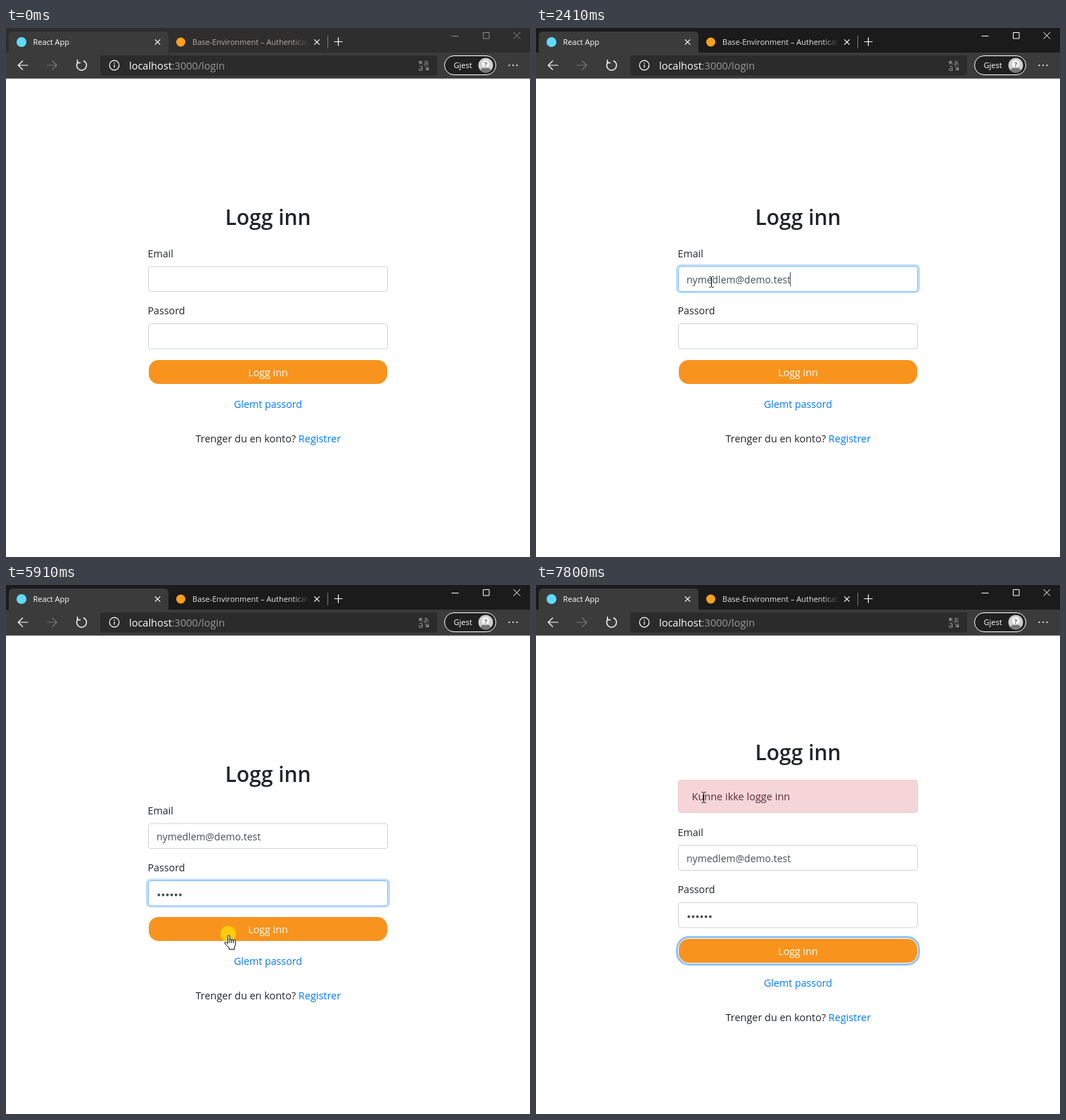
Recreate the animation shown at these times as an HTML page. Size 745 by 752 pixels, loop 8000 ms.

```html
<!DOCTYPE html>
<html lang="no">
<head>
<meta charset="utf-8">
<title>Logg inn</title>
<style>
  html, body { margin: 0; width: 100%; height: 100%; overflow: hidden; background: #fff; }
  svg { display: block; }
  text { font: 14.25px "Open Sans", "Noto Sans", sans-serif; fill: #212529; }
  .mid { text-anchor: middle; }
  .small { font-size: 11px; fill: #fff; }
  .url { font-size: 14.5px; fill: #fff; }
  .link { fill: #007bff; }
  .value { fill: #495057; }
  .line { fill: none; stroke: #fff; stroke-width: 1.2; }
  .ring { fill: none; stroke: #007bff; stroke-width: 3; stroke-opacity: .25; }
  .box { fill: #fff; stroke: #ced4da; }
  .caret { stroke: #495057; }
</style>
</head>
<body>
<svg width="745" height="752" viewBox="0 0 745 752">
  <defs>
    <linearGradient id="fade" gradientUnits="userSpaceOnUse" x1="408" x2="430" y1="0" y2="0">
      <stop stop-color="currentColor"/>
      <stop offset="1" stop-color="currentColor" stop-opacity="0"/>
    </linearGradient>
    <path id="cross" d="M-3.7-3.7l7.4 7.4m0-7.4l-7.4 7.4"/>
  </defs>

  <!-- browser frame -->
  <rect id="titlebar" width="745" height="36"/>
  <path fill="#3b3b3b" d="M0 35h4V11q0-6 6-6h215q6 0 6 6v24h514v37H0z"/>
  <path stroke="#555" d="M0 71.500h745"/>
  <circle cx="22" cy="20" r="7" fill="#61dafb"/>
  <text class="small" x="38.500" y="24">React App</text>
  <use href="#cross" class="line" x="215.500" y="20"/>
  <circle cx="248.500" cy="20" r="6.500" fill="#f9a11b"/>
  <text class="small" x="265" y="24" style="fill:url(#fade)">Base-Environment – Authentication</text>
  <use href="#cross" class="line" x="442" y="20"/>
  <path class="line" style="stroke:#777;stroke-width:1" d="M457.500 11v18"/>
  <path class="line" d="M466.500 19.500h12m-6-6v12"/>
  <path id="controls" class="line" style="stroke-width:1" d="M633.500 11.500h10M678.500 6.500h8.500v8.500h-8.500zM721.500 6l9.500 9.500m0-9.500l-9.500 9.500"/>
  <path class="line" d="M31.500 53h-14m6.500-6.500L17.300 53l6.700 6.500"/>
  <path class="line" style="stroke:#777" d="M58 53h14m-6.500-6.500L72.200 53l-6.700 6.500"/>
  <path class="line" style="stroke-width:1.400" d="M102.500 48.200a7 7 0 1 0 7.500-1.700M101.500 45v4.500h4.500"/>
  <rect x="134" y="39" width="479" height="28.500" rx="3" fill="#2b2b2b"/>
  <circle class="line" cx="154" cy="53" r="6.800"/>
  <path class="line" d="M154 52v4.500m0-7.500v1.500"/>
  <text class="url" x="175" y="58.500">localhost<tspan fill="#9a9a9a">:3000/login</tspan></text>
  <g fill="#9a9a9a">
    <text x="586.500" y="60.500" style="font-size:12px;fill:inherit">a</text>
    <text x="593.500" y="53" style="font:8px 'Noto Sans CJK JP','Noto Sans CJK',sans-serif;fill:inherit">あ</text>
    <path class="line" style="stroke:#9a9a9a" d="M592 47.500h-4v4m0-4l4 4M596.500 55.500l4 4m0-4v4h-4"/>
  </g>
  <rect x="623.500" y="39.500" width="73" height="27" rx="13.500" fill="#202020" stroke="#fff"/>
  <text class="small" x="636.500" y="57">Gjest</text>
  <circle cx="682" cy="53" r="10.500" fill="#cfcfcf"/>
  <path fill="#777" d="M674.500 60.300q1.500-4 7.500-4t7.500 4a10.500 10.500 0 0 1-15 0z"/>
  <circle cx="682" cy="51" r="5.500" fill="#f4f4f4"/>
  <text class="mid" x="682" y="54.500" style="font-size:9px;font-weight:600;fill:#444">?</text>
  <g fill="#fff"><circle cx="715.500" cy="53" r="1.100"/><circle cx="721" cy="53" r="1.100"/><circle cx="726.500" cy="53" r="1.100"/></g>

  <!-- login page -->
  <text id="heading" class="mid" x="372.500" y="280" style="font-size:30px;font-weight:600">Logg inn</text>
  <g id="alert">
    <rect x="202.500" y="277.500" width="340" height="46" rx="3.500" fill="#f6d5d8" stroke="#f5c6cb"/>
    <text x="221.500" y="306" style="font-size:14.500px;fill:#5a2a35">Kunne ikke logge inn</text>
  </g>
  <g id="form">
    <text x="201.500" y="325.500">Email</text>
    <rect id="mailRing" class="ring" x="200.500" y="337.500" width="344" height="38" rx="5"/>
    <rect id="mailBox" class="box" x="202.500" y="339" width="340" height="35.500" rx="3.500"/>
    <text id="mail" class="value" x="214" y="363" style="font-size:14px">nymedlem@demo.test</text>
    <path id="mailCaret" class="caret" d="M.500 347v20"/>
    <text x="201.500" y="407">Passord</text>
    <rect id="passRing" class="ring" x="200.500" y="419" width="344" height="38" rx="5"/>
    <rect id="passBox" class="box" x="202.500" y="420.500" width="340" height="35.500" rx="3.500"/>
    <g id="dots" fill="#495057"></g>
    <path id="passCaret" class="caret" d="M.500 429v20"/>
    <g id="eye" fill="none" stroke="#212529" stroke-width="1.300">
      <path d="M510.700 438q7.300-8.500 14.600 0q-7.300 8.500-14.600 0z"/>
      <circle cx="518" cy="437.700" r="2.300"/>
    </g>
    <rect id="buttonRing" x="200.500" y="469.500" width="344" height="39" rx="17" fill="#fff" stroke="#8cc4ff" stroke-width="3"/>
    <rect x="203" y="472" width="339" height="34" rx="14" fill="#f8931d"/>
    <text class="mid" x="372.500" y="495" style="fill:#fff">Logg inn</text>
    <text class="link mid" x="372.500" y="539.500">Glemt passord</text>
    <text class="mid" x="372.800" y="589" style="font-size:14.450px">Trenger du en konto? <tspan class="link">Registrer</tspan></text>
  </g>

  <!-- pointer -->
  <g id="pointer">
    <circle id="click" r="11.200" fill="#fff000" fill-opacity=".6"/>
    <path id="arrow" fill="#fff" stroke="#000" d="M.500.500v15.500l3.600-3.400 2.500 5.600 2.400-1-2.500-5.500h4.800z"/>
    <path id="beam" fill="none" stroke="#000" d="M-2.500-7.500h2l1 1 1-1h2M.500-6.500v13M-2.500 7.500h2l1-1 1 1h2"/>
    <path id="hand" fill="#fff" stroke="#000" stroke-linejoin="round" d="M-.500 13V3.500q0-1.500 1.300-1.500t1.300 1.500V9q0-1.300 1.300-1.300T4.700 9.200q.2-1.200 1.300-1.200t1.300 1.500q.3-1 1.400-1T10.200 10v5.500L8.700 19v3H1.200v-2.500L-4.800 14q-.8-2 .8-2.200t3.500 2.700M2.100 9v4M4.700 9.200V13M7.300 9.500V13"/>
  </g>
</svg>
<script>
const LOOP = 8000, SHIFT = 31, DOT = 6.1;
const el = Object.fromEntries([...document.querySelectorAll('svg [id]')].map(e => [e.id, e]));
const show = (e, on) => e.style.display = on ? '' : 'none';
const within = (t, a, b) => t >= a && t < b;

// Each move: first and last step time, step count, end point
const start = [686, 752];
const moves = [
  [520, 1240, 10, 248, 355],
  [2410, 2790, 6, 261, 437],
  [5280, 5910, 9, 316, 496],
  [6840, 7400, 8, 241, 296],
  [7480, 7630, 3, 268, 302],
  [7710, 7800, 2, 238, 302],
];
const keys = [3970, 4050, 4130, 4510, 4740, 4970];
const clicks = [1390, 2960, 5910];

for (let i = 0; i < keys.length; i++)
  el.dots.innerHTML += `<circle cx="${217.3 + i * DOT}" cy="440.5" r="1.9"/>`;

function pointerAt(t) {
  let [x, y] = start;
  for (const [a, b, n, tx, ty] of moves) {
    if (t < a) break;
    const step = Math.floor((t - a) / (b - a) * (n - 1) + .001);
    const p = Math.min(1, (step + 1) / n), e = p * p * (3 - 2 * p);
    x += (tx - x) * e;
    y += (ty - y) * e;
  }
  return [x, y];
}

function pointerKind(x, y, failed) {
  const fy = failed ? y - SHIFT : y;
  const hit = (x0, x1, y0, y1) => within(x, x0, x1) && within(fy, y0, y1);
  if (hit(203, 542, 472, 507) || hit(324, 421, 525, 545) || hit(417, 476, 574, 594)) return 'hand';
  if (hit(202, 543, 339, 375) || hit(202, 543, 420, 456)) return 'beam';
  if (failed && within(x, 222, 363) && within(y, 288, 316)) return 'beam';
  return 'arrow';
}

// Focus transition, 0 to 1 in a few steps
function focus(t, at) {
  if (t < at) return 0;
  const p = Math.min(1, Math.floor((t - at) / 70) * 70 / 150);
  return 1 - (1 - p) ** 2;
}

function field(ring, box, amount) {
  const mix = (a, b) => Math.round(a + (b - a) * amount);
  ring.style.opacity = amount;
  box.style.stroke = `rgb(${mix(206, 128)},${mix(212, 189)},${mix(218, 255)})`;
}

function draw(t) {
  const active = t >= clicks[0], failed = t >= 6440;
  el.titlebar.style.fill = active ? '#1b1b1b' : '#2e2e2e';
  el.fade.style.color = active ? '#e4e4e4' : '#b4aaa6';
  el.controls.style.stroke = active ? '#fff' : '#8c8c8c';

  el.heading.setAttribute('y', failed ? 280 - SHIFT : 280);
  el.form.setAttribute('transform', `translate(0 ${failed ? SHIFT : 0})`);
  show(el.alert, failed);

  const [onMail, onPass, onButton] = clicks.map(at => focus(t, at));
  field(el.mailRing, el.mailBox, onMail - onPass);
  field(el.passRing, el.passBox, onPass - onButton);
  el.buttonRing.style.opacity = onButton;

  const filled = t >= 2090;
  show(el.mail, filled);
  show(el.mailCaret, within(t, 1390, 1940) || within(t, 2090, 2620));
  el.mailCaret.setAttribute('transform', `translate(${filled ? 361 : 214} 0)`);

  const typed = keys.filter(k => t >= k).length;
  [...el.dots.children].forEach((dot, i) => show(dot, i < typed));
  show(el.passCaret, within(t, 2960, 3490) || within(t, 3970, 5510));
  el.passCaret.setAttribute('transform', `translate(${Math.round(214 + typed * DOT)} 0)`);
  show(el.eye, within(t, keys[0], clicks[2]));

  const [x, y] = pointerAt(t).map(Math.round), kind = pointerKind(x, y, failed);
  show(el.pointer, t >= 520);
  el.pointer.setAttribute('transform', `translate(${x} ${y})`);
  for (const k of ['arrow', 'beam', 'hand']) show(el[k], k === kind);
  show(el.click, clicks.some(at => within(t, at, at + 70)));
}

function frame() {
  draw(performance.now() % LOOP);
  requestAnimationFrame(frame);
}
frame();
</script>
</body>
</html>
```
